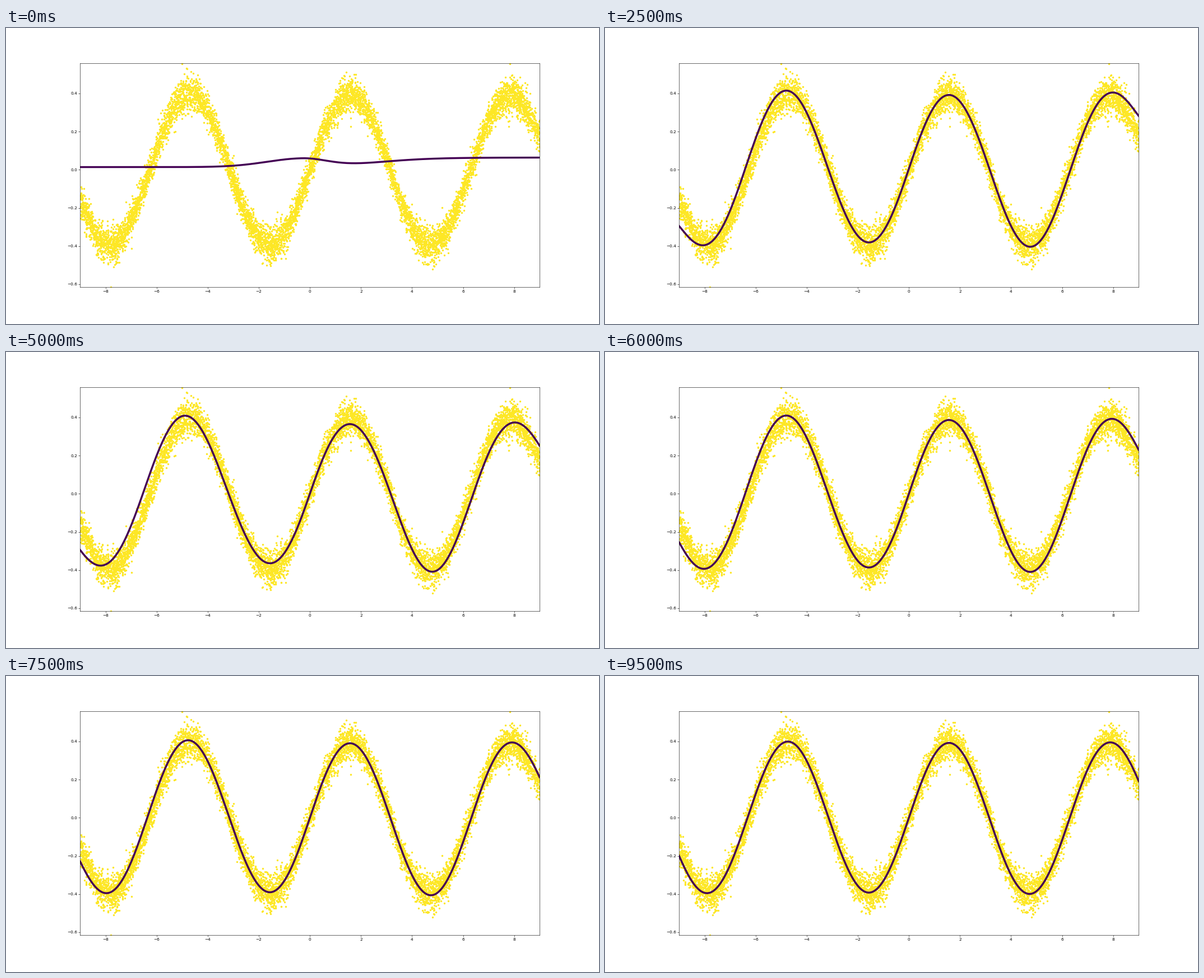
Animation of 1058x529 px, one loop 10 s. Source, as a matplotlib script:

```python
import numpy as np
import matplotlib.pyplot as plt
from matplotlib.animation import FuncAnimation

STEP = 500
FRAMES = 20
YELLOW, PURPLE = "#fde725", "#440154"
DOT = 10 ** 0.5 + 1.5  # marker diameter plus edge, in points
XS = np.linspace(-9, 9, 721)

# How the fitted wave swings and stretches during training
TIMES = [500, 1000, 1500, 2500, 5000, 6500, 8500, 9500]
GAIN = [0.485, 0.397, 0.378, 0.398, 0.387, 0.404, 0.393, 0.396]
DRIFT = [-0.04, -0.04, -0.04, 0.13, 0.26, 0.07, 0.11, 0.04]


def untrained(x):
    """Nearly flat first guess: a soft step with a lopsided bump."""
    step = 0.05 / (1 + np.exp(-0.9 * (x - 2.6)))
    width = np.where(x < -0.3, 2.0, 1.35)
    return 0.014 + step + 0.043 * np.exp(-((x + 0.3) / width) ** 2)


def ramp(u):
    t = np.clip((u - 2) / 4.5, 0, 1)
    return t * t * (3 - 2 * t)


def fit(ms, x=XS):
    if ms == 0:
        return untrained(x)
    gain = np.interp(ms, TIMES, GAIN)
    drift = np.interp(ms, TIMES, DRIFT)
    age = ms - 1500
    bias = 0.017 * np.exp(-max(age, 0) / 900)
    # The outer ends lag behind and straighten out as training goes on
    edge = 0.115 * np.exp(-max(age, 0) / 5000) * np.sign(x) * (np.abs(x) / 9) ** 16
    phase = x + drift * (ramp(-x) - 0.45 * ramp(x))
    swell = 1 + 0.22 * drift * np.cos(np.abs(x) - 4.8)
    return gain * swell * np.sin(phase) + bias + edge


def samples(n=8000):
    rng = np.random.default_rng(4)
    x = rng.uniform(-9, 9, n)
    s = np.sin(x)
    y = 0.395 * s + rng.normal(0, 1, n) * (0.037 + 0.009 * s ** 2)
    # The extremes that set the vertical limits
    return np.append(x, [-7.8, -5, 7.83]), np.append(y, [-0.615, 0.556, 0.556])


fig = plt.figure(figsize=(20, 10), dpi=52.9, facecolor="white")
ax = fig.add_axes([0.125, 0.125, 0.775, 0.755])
ax.scatter(*samples(), s=10, c=YELLOW, linewidths=1.5)
curve, = ax.plot(XS, fit(0), color=PURPLE, lw=DOT)
ax.set(xlim=(-9, 9), ylim=(-0.6147, 0.5570),
       xticks=range(-8, 9, 2), yticks=np.arange(-3, 3) / 5)


def update(frame):
    curve.set_ydata(fit(frame * STEP))
    return curve,


anim = FuncAnimation(fig, update, frames=FRAMES, interval=STEP,
                     repeat=True, repeat_delay=0)
plt.show()
```
